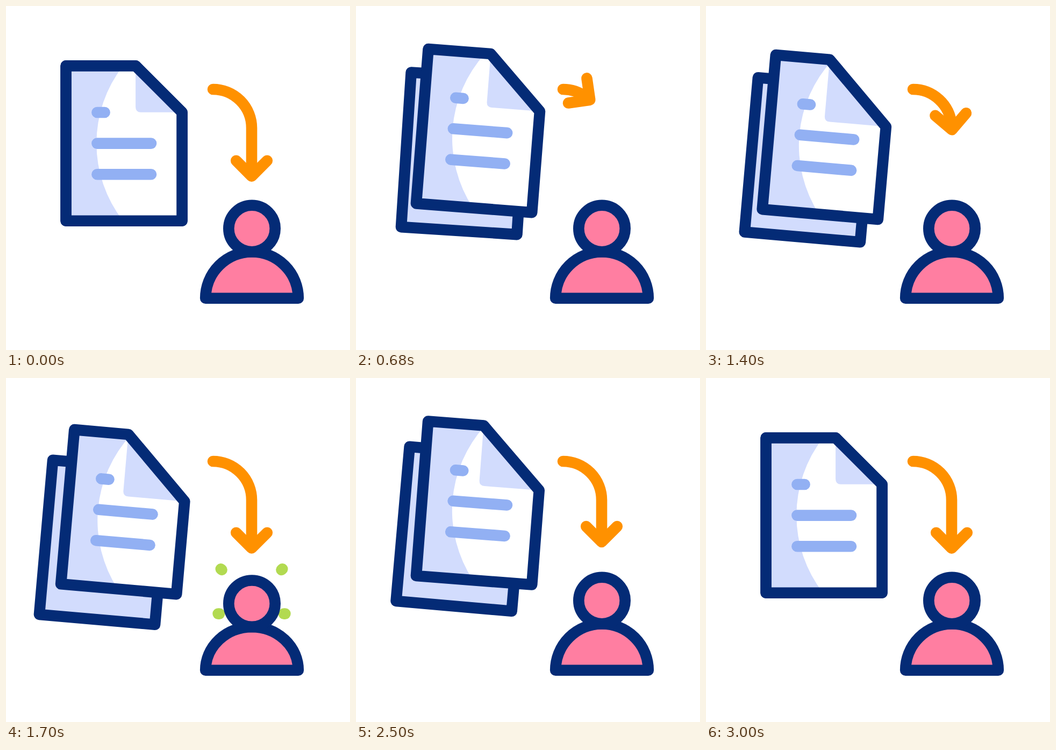
Animation of 640x640 px, one loop 3.32 s. Source, as an HTML page:

```html
<!DOCTYPE html>
<html lang="en">
<head>
<meta charset="utf-8">
<title>Document transfer</title>
<style>
  html, body { margin: 0; width: 100%; height: 100%; overflow: hidden; background: #fff; }
  svg { display: block; width: 100vw; height: 100vh; }
  path, circle { stroke-width: 20.6; stroke-linecap: round; stroke-linejoin: round; }
  .outline { stroke: #042b76; }
  .line { fill: none; stroke: #92b0f3; }
  .tint { fill: #d2dcfd; }
  .white { fill: #fff; }
  .clear { fill: none; }
  .pink { fill: #ff7ea1; }
  .arrow { fill: none; stroke: #ff9100; }
  .spark { fill: none; stroke: #b2da51; }
</style>
</head>
<body>
<svg viewBox="0 0 640 640">
  <g id="back"><path id="backSheet" class="outline tint"/></g>
  <g id="front">
    <path id="paper" class="white"/>
    <path class="tint" d="M111.6 111.4H217.7A235 235 0 0 0 217.7 399.7H111.6Z"/>
    <path id="flap" class="tint"/>
    <path class="line" d="M169.4 198H183.6M169.4 255.6H270M169.4 313.2H270"/>
    <path id="frame" class="outline clear"/>
  </g>
  <path id="shaft" class="arrow"/>
  <path id="head" class="arrow" d="M-19.8 -28.8L9 0L-19.8 28.8"/>
  <path id="sparks" class="spark"/>
  <path id="body" class="outline pink"/>
  <circle id="face" class="outline pink" cx="457.5" r="43.2"/>
</svg>
<script>
const LOOP = 3320;
const PAGE = { left: 111.6, top: 111.4, right: 327.5, bottom: 399.7 };
const BEND = { x: 385, y: 227, r: 72 };
const BEND_LENGTH = BEND.r * Math.PI / 2;
const el = id => document.getElementById(id);
const set = (id, name, value) => el(id).setAttribute(name, value);
const mix = (a, b, k) => a + (b - a) * k;

function ease(t, start, end) {
  const s = Math.min(1, Math.max(0, (t - start) / (end - start)));
  return s * s * (3 - 2 * s);
}

// Eased value through [time, value] keys.
function track(t, keys) {
  let value = keys[0][1];
  for (let i = 1; i < keys.length; i++) {
    if (t < keys[i - 1][0]) break;
    value = mix(keys[i - 1][1], keys[i][1], ease(t, keys[i - 1][0], keys[i][0]));
  }
  return value;
}

function sheet(fold) {
  const { left, top, right, bottom } = PAGE;
  return `M${left} ${top}H${right - fold}L${right} ${top + fold}V${bottom}H${left}Z`;
}

function flap(fold) {
  const x = PAGE.right - fold, y = PAGE.top + fold;
  return `M${x} ${PAGE.top}V${y - 10}Q${x} ${y} ${x + 10} ${y}H${PAGE.right}Z`;
}

function placePage(id, open, dx, dy, dip) {
  const x = dx * open - 12.7 * dip, y = dy * open + 25.2 * dip;
  set(id, "transform", `translate(${x} ${y}) rotate(${5 * open} 219.55 255.55)`);
}

function drawArrow(length) {
  const angle = Math.min(length, BEND_LENGTH) / BEND.r;
  const x = BEND.x + BEND.r * Math.sin(angle);
  const bendY = BEND.y - BEND.r * Math.cos(angle);
  const y = bendY + Math.max(0, length - BEND_LENGTH);
  set("shaft", "d", `M${BEND.x} ${BEND.y - BEND.r}A${BEND.r} ${BEND.r} 0 0 1 ${x} ${bendY}V${y}`);
  set("head", "transform", `translate(${x} ${y}) rotate(${angle * 180 / Math.PI})`);
}

function drawSparks(t) {
  const tip = ease(t, 1560, 2200), tail = ease(t, 1605, 2245);
  let d = "";
  if (tip - tail > 0.002) {
    for (const side of [-1, 1]) {
      const ray = (x1, y1, x2, y2) => {
        const at = k => `${457 + side * mix(x1, x2, k)} ${mix(y1, y2, k)}`;
        d += `M${at(tail)}L${at(tip)}`;
      };
      ray(53.8, 358.4, 81.6, 333.5);
      ray(57.4, 438.6, 98, 438.6);
    }
  }
  set("sparks", "d", d);
}

function render(t) {
  const frontOpen = track(t, [[200, 0], [800, 1], [2400, 1], [2870, 0]]);
  const backOpen = track(t, [[280, 0], [880, 1], [2590, 1], [3000, 0]]);
  const folded = track(t, [[400, 0], [1000, 1], [2400, 1], [2900, 0]]);
  const frontDip = track(t, [[1180, 0], [1580, 1], [1980, 0]]);
  const backDip = track(t, [[1280, 0], [1680, 1], [2080, 0]]);
  placePage("front", frontOpen, 12.6, -26.1, frontDip);
  placePage("back", backOpen, -24.9, 25.2, backDip);

  const fold = mix(86.4, 115.2, folded);
  set("paper", "d", sheet(fold));
  set("frame", "d", sheet(fold));
  set("flap", "d", flap(fold));

  drawArrow(track(t, [
    [200, 193.7], [600, 30], [1000, 182],
    [1180, 182], [1390, 107], [1690, 193.7], [2040, 182],
    [2600, 182], [3000, 193.7]
  ]));
  drawSparks(t);

  const squash = track(t, [[1500, 0], [1780, 7], [2230, 0]]);
  set("face", "cy", 414 + squash);
  set("body", "d", `M371.2 543.7A86.3 ${86.3 - squash} 0 0 1 543.8 543.7Z`);
}

set("backSheet", "d", sheet(86.4));
const begin = performance.now();
function tick() {
  render((performance.now() - begin) % LOOP);
  requestAnimationFrame(tick);
}
tick();
</script>
</body>
</html>
```
